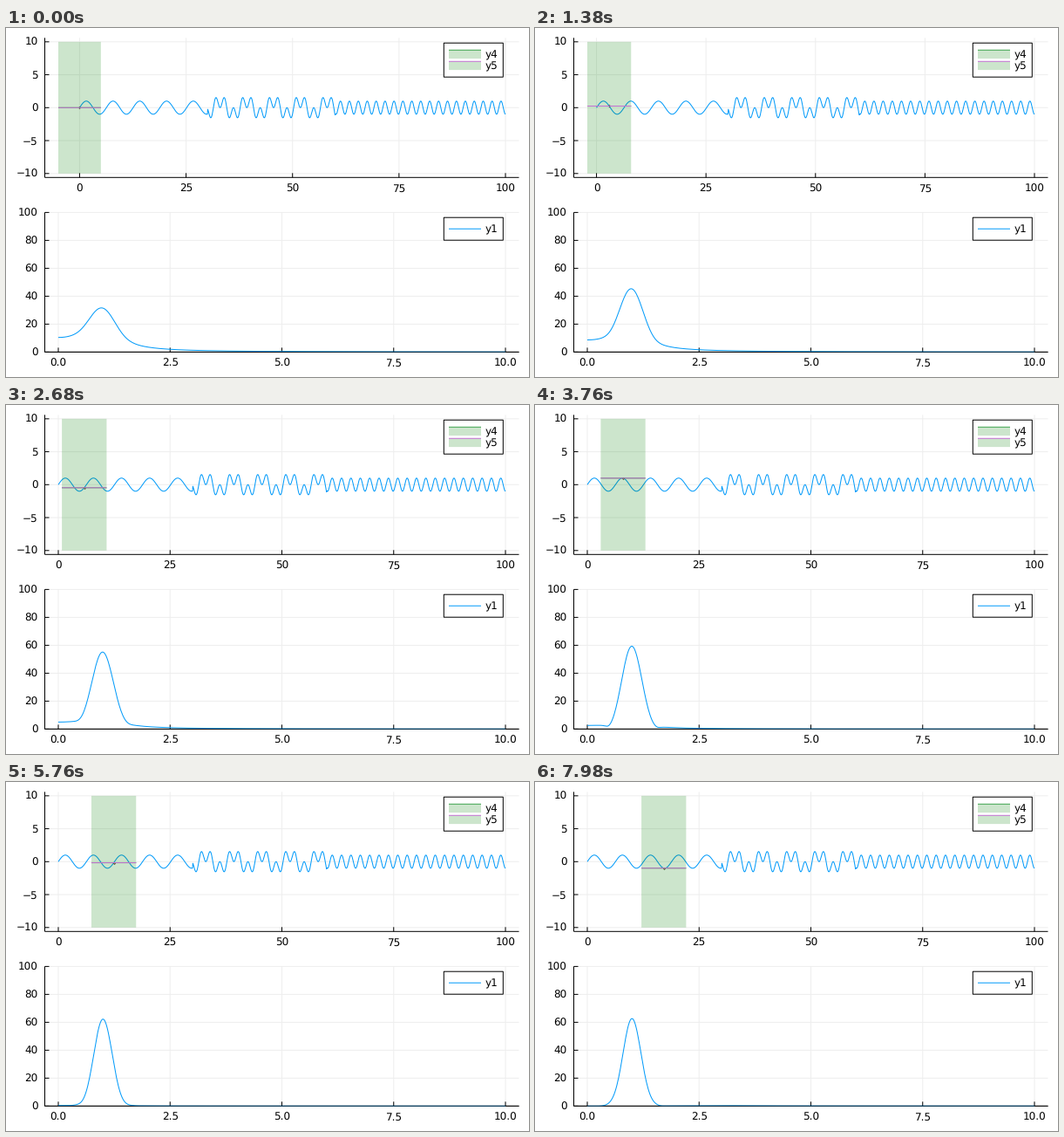
A matplotlib script for the animation above (8000 ms loop, 600 by 400 pixels).

```python
import numpy as np
import matplotlib.pyplot as plt
from matplotlib.animation import FuncAnimation
from matplotlib.patches import Rectangle

W, H, DPI = 600, 400, 100
PX = 72 / DPI                      # one pixel in points
BLUE, ORANGE, GREEN, PURPLE = "#009afa", "#e36f47", "#3ea44e", "#c371d2"
GRID = "#eeeeee"
FILL = dict(facecolor="#008000", alpha=0.2, linewidth=0, snap=False)
LEFT, RIGHT = 44.5, 588.5          # plot area, both panels
X0, X1 = 60.0, 573.0               # where the data starts and ends
TOP, BOTTOM = (11.3, 171.3), (211.4, 371.4)
TICK = 5
STEP_MS = 20
LOOP_MS = 8000

# Signal in three parts, and its Gaussian-windowed spectrum
t = np.arange(1001) / 10
signal = np.where(t <= 30, np.sin(t),
                  np.where(t <= 60, np.sin(t) + np.sin(3 * t), np.sin(3 * t)))
omega = np.linspace(0, 10, 501)
waves = np.exp(-1j * np.outer(t, omega))
taus = np.arange(172) / 10
windows = np.exp(-(t - taus[:, None]) ** 2 / (2 * 5 ** 2))
spectra = np.abs((windows * signal) @ waves)

plt.rcParams["font.family"] = "DejaVu Sans"
plt.rcParams["text.hinting"] = "none"
fig = plt.figure(figsize=(W / DPI, H / DPI), dpi=DPI, facecolor="white")
ax = fig.add_axes([0, 0, 1, 1])
ax.set_xlim(0, W)
ax.set_ylim(H, 0)
ax.axis("off")


def top_y(v):
    return sum(TOP) / 2 - v * 160 / 21.2


def low_y(v):
    return BOTTOM[1] - 1.6 * v


def line(xs, ys, color="black", z=2, width=1.0, **kw):
    return ax.plot(xs, ys, color=color, lw=width * PX, zorder=z,
                   solid_capstyle="butt", snap=False, **kw)[0]


def label(x, y, text, ha="center", z=3):
    return ax.text(x, y + 4.4, text, ha=ha, va="baseline",
                   fontsize=12 * PX, color="black", zorder=z)


def y_axis(span, values, to_px):
    line([LEFT, LEFT], span)
    line([LEFT, RIGHT], [span[1]] * 2)
    for v in values:
        y = to_px(v)
        line([LEFT, RIGHT], [y, y], GRID, 1)
        line([LEFT, LEFT + TICK], [y, y])
        label(36.7, y, str(v).replace("-", "\u2212"), "right")


def x_tick(x, span, text):
    grid = line([x, x], span, GRID, 1)
    tick = line([x, x], [span[1] - TICK, span[1]])
    return grid, tick, label(x, span[1] + 11.7, text)


def legend(top, rows):
    """Boxed rows of (color, text, filled), 13 px apart."""
    ax.add_patch(Rectangle((502.3, top), 68, 13 * (len(rows) + 1),
                           facecolor="white", edgecolor="black",
                           lw=PX, snap=False, zorder=8))
    for n, (color, text, filled) in enumerate(rows, 1):
        y = edge = top + 13 * n
        if filled:
            edge = y - 4.9
            ax.add_patch(Rectangle((508, edge), 37, 9.8, zorder=9, **FILL))
        line([508, 545], [edge, edge], color, 10)
        label(550, y, text, "left", 10)


y_axis(TOP, (-10, -5, 0, 5, 10), top_y)
y_axis(BOTTOM, (0, 20, 40, 60, 80, 100), low_y)
x_marks = [(v, x_tick(X0, TOP, str(v))) for v in (0, 25, 50, 75, 100)]
for v in (0, 2.5, 5, 7.5, 10):
    x_tick(X0 + v * (X1 - X0) / 10, BOTTOM, f"{v:.1f}")
legend(17.2, [(GREEN, "y4", True), (PURPLE, "y5", True)])
legend(217.2, [(BLUE, "y1", False)])

# Moving parts
wave = line([], [], BLUE, 4)
dot = ax.plot([], [], "o", ms=1.6 * PX, mfc=ORANGE, mec="black",
              mew=0.5 * PX, snap=False, zorder=4.5)[0]
upper = ax.add_patch(Rectangle((0, 0), 1, 1, zorder=5, **FILL))
upper_line = line([], [], GREEN, 5.2)
lower = ax.add_patch(Rectangle((0, 0), 1, 1, zorder=5.4, **FILL))
lower_line = line([], [], PURPLE, 5.6)
spectrum = line(X0 + omega * (X1 - X0) / 10, low_y(spectra[0]), BLUE, 4)
# the axis shows through where the curve lies on zero
line([LEFT, RIGHT], [BOTTOM[1]] * 2, z=6, alpha=0.7)


def step_at(ms):
    """Steps come in groups of three, held 20, 100 and 20 ms."""
    group, rest = divmod(ms, 140)
    return 3 * group + (rest >= 20) + (rest >= 120)


def update(i):
    k = step_at(i * STEP_MS)
    tau, value = taus[k], signal[k]
    start = min(0, tau - 5)
    scale = (X1 - X0) / (100 - start)

    def top_x(v):
        return X0 + (v - start) * scale

    for v, (grid, tick, text) in x_marks:
        x = top_x(v)
        grid.set_xdata([x, x])
        tick.set_xdata([x, x])
        text.set_x(x)

    wave.set_data(top_x(t), top_y(signal))
    y = top_y(value)
    dot.set_data([top_x(tau)], [y])
    a, b = top_x(tau - 5), top_x(tau + 5)
    upper.set_bounds(a, top_y(10), b - a, y - top_y(10))
    lower.set_bounds(a, y, b - a, top_y(-10) - y)
    for edge in (upper_line, lower_line):
        edge.set_data([a, b], [y, y])
    spectrum.set_ydata(low_y(spectra[k]))
    return []


anim = FuncAnimation(fig, update, frames=LOOP_MS // STEP_MS,
                     init_func=lambda: update(0), interval=STEP_MS,
                     repeat=True, repeat_delay=0, blit=False)
plt.show()
```
